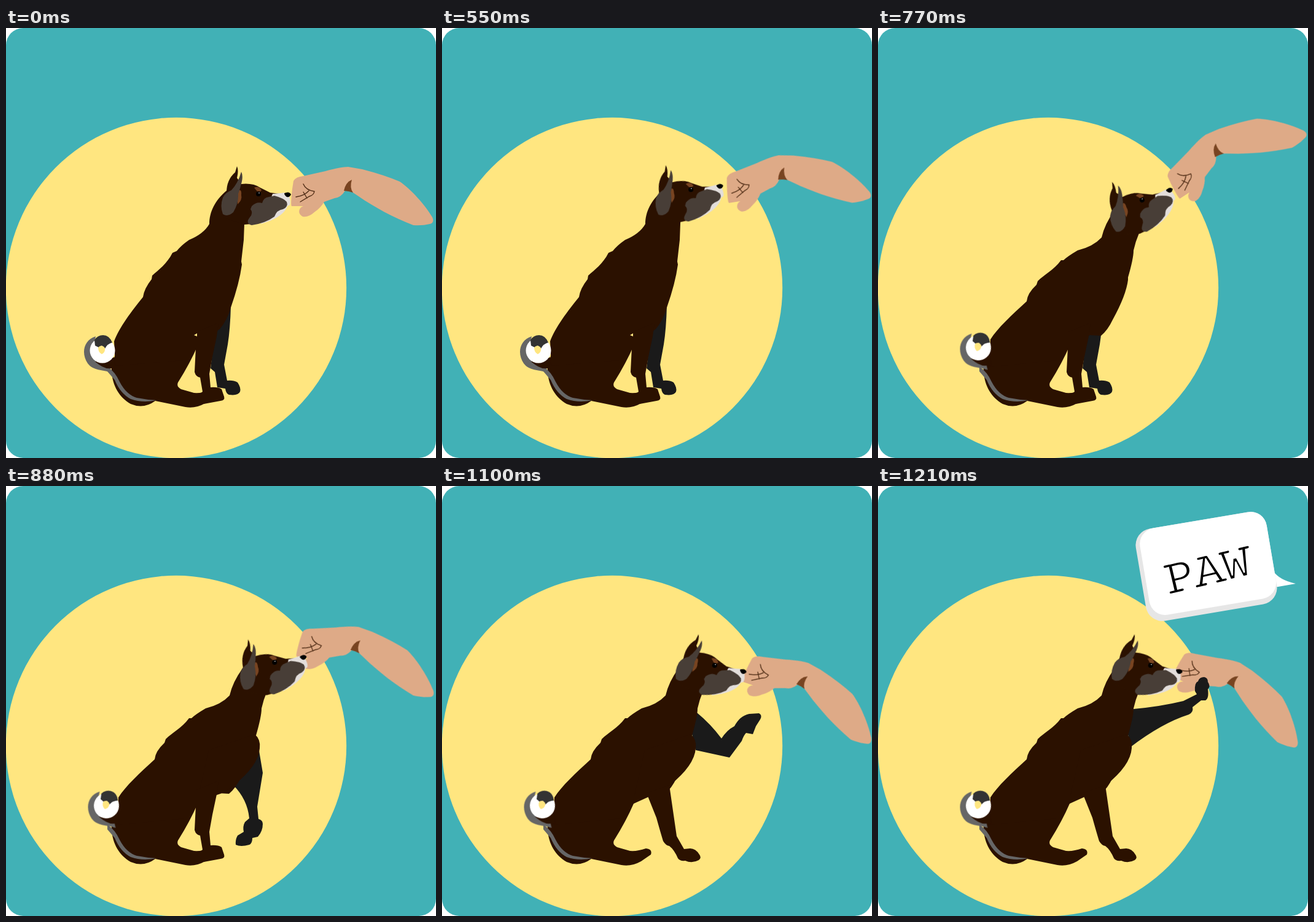
Recreate the animation shown at these times as an HTML page without scripts. Size 700x700 px, loop 2.31 s.

```html
<!DOCTYPE html>
<html lang="en">
<head>
<meta charset="utf-8">
<title>Paw</title>
<style>
  html, body { margin: 0; width: 100%; height: 100%; overflow: hidden; background: #fff; }
  svg { display: block; width: 100%; height: 100%; }

  .fur { fill: #2b1100; }
  .black { fill: #1a1a1a; }
  .mask { fill: #483e37; }
  .gray { fill: #666; }
  .tan { fill: #784421; }
  .skin { fill: #deaa87; }
  .line { fill: none; stroke: #502d16; stroke-width: 1.4; stroke-linecap: round; }

  /* Every pose holds, then switches: 21 beats of 110 ms */
  .arm, .head, .tail, .curl, .pose { animation: 2310ms step-end infinite; }

  .arm { transform-origin: 556px 258px; animation-name: arm; }
  @keyframes arm {
    0%      { transform: none; }
    23.810% { transform: translate(-4px, -19px) rotate(-9deg); }
    28.571% { transform: translate(-6px, -39px) rotate(-21deg); }
    33.333% { transform: translate(-6px, -57px) rotate(-33.3deg); }
    38.095% { transform: translate(12px, 3px) rotate(9.6deg); }
    42.857% { transform: translate(21px, 31px) rotate(14.5deg); }
    47.619% { transform: translate(29px, 60px) rotate(19.2deg); }
    52.381%, 100% { transform: translate(20px, 59px) rotate(23deg); }
  }

  .head { transform-origin: 411px 269px; animation-name: head; }
  @keyframes head {
    0%      { transform: none; }
    23.810% { transform: translate(-6px, -7px) rotate(-8deg); }
    28.571% { transform: translate(-6px, -8px) rotate(-14deg); }
    33.333% { transform: translate(18.5px, 10px) rotate(-21deg); }
    38.095% { transform: translate(26px, 17px) rotate(-11.3deg); }
    42.857% { transform: translate(30px, 20px) rotate(0deg); }
    47.619%, 100% { transform: translate(33px, 22px) rotate(10.5deg); }
  }

  .tail { animation-name: tail; }
  @keyframes tail {
    0% { transform: none; }
    33.333%, 100% { transform: translate(6.5px, -4.5px); }
  }
  .curl { transform-origin: 157px 525px; animation-name: curl; }
  @keyframes curl {
    0% { transform: none; }
    33.333%, 100% { transform: rotate(15deg); }
  }

  .upright  { animation-name: upright; }
  .leaning  { animation-name: leaning; }
  .chest    { animation-name: chest; }
  .planted  { animation-name: planted; }
  .forward  { animation-name: forward; }
  .far-down { animation-name: far-down; }
  .far-step { animation-name: far-step; }
  .far-lift { animation-name: far-lift; }
  .far-bend { animation-name: far-bend; }
  .reach    { animation-name: reach; }
  @keyframes upright  { 0% { opacity: 1 } 33.333%, 100% { opacity: 0 } }
  @keyframes leaning  { 0% { opacity: 0 } 33.333%, 100% { opacity: 1 } }
  @keyframes chest    { 0% { opacity: 0 } 38.095%, 100% { opacity: 1 } }
  @keyframes planted  { 0% { opacity: 1 } 47.619%, 100% { opacity: 0 } }
  @keyframes forward  { 0% { opacity: 0 } 47.619%, 100% { opacity: 1 } }
  @keyframes far-down { 0% { opacity: 1 } 38.095%, 100% { opacity: 0 } }
  @keyframes far-step { 0% { opacity: 0 } 38.095% { opacity: 1 } 42.857%, 100% { opacity: 0 } }
  @keyframes far-lift { 0% { opacity: 0 } 42.857% { opacity: 1 } 47.619%, 100% { opacity: 0 } }
  @keyframes far-bend { 0% { opacity: 0 } 47.619% { opacity: 1 } 52.381%, 100% { opacity: 0 } }
  @keyframes reach    { 0% { opacity: 0 } 52.381%, 100% { opacity: 1 } }

  .word {
    font: 72px "Liberation Mono", "Courier New", monospace;
    letter-spacing: 3px;
    stroke: #fff; stroke-width: 2.2;
  }
  .serif { fill: none; stroke: #000; stroke-width: 3.4; stroke-linecap: round; }
</style>
</head>
<body>
<svg viewBox="0 0 700 700">
  <rect width="700" height="700" rx="28" fill="#41b1b6"/>
  <circle cx="277" cy="423" r="277.2" fill="#ffe680"/>

  <g class="arm">
    <path class="skin" d="M468 249Q472 242 484 241L520 233Q545 226 557 226L580 230Q615 239 641 250C660 263 682 288 694 308Q698 317 690 319Q678 322 663 321C630 308 600 292 574 274L562 266L552 265Q545 276 535 277L518 283Q512 293 503 299Q492 309 483 307Q475 303 478 295Q480 291 484 290L465 290Q463 288 466 262Z"/>
    <path class="tan" d="M563 247Q553 251 550 265L558 266L565 268Q559 260 563 247Z"/>
    <path class="line" d="M484 254Q488 264 502 266M472 275Q486 273 493 265M484 267L490 277M502 266Q501 272 494 274L479 283"/>
  </g>

  <!-- Far foreleg -->
  <g class="black">
    <path class="pose far-down" d="M345 465L366 452Q365 490 361 515L355 548L360 574Q370 573 377 577Q383 586 381 592Q378 599 363 597Q358 595 357 587L344 585L340 560L333 554L337 520Z"/>
    <path class="pose far-step" d="M411 425L418 467L409 522L411 542Q418 544 418 550Q418 562 410 571L401 573Q401 582 396 584Q382 588 374 584Q373 576 377 569L387 563Q385 554 389 547L396 541Q393 510 370 487Z"/>
    <path class="pose far-lift" d="M414 390L440 425L450 452L449 474L462 492Q467 502 460 507L448 509L439 498L430 478L432 466L396 455Z"/>
    <path class="pose far-bend" d="M415 369Q437 387 455 411Q464 397 476 391Q485 374 500 371L516 370Q522 373 518 380L511 391L506 404L495 402Q491 406 488 415L468 442L413 430L406 400Z"/>
    <path class="pose reach" d="M416 363Q460 359 497 350L519 339L516 334Q515 320 521 318Q523 311 531 311Q537 312 537 319Q542 326 537 331Q539 346 533 349L526 349L512 360Q514 368 506 372Q462 386 411 425L405 395Z"/>
  </g>

  <!-- Body -->
  <g class="fur">
    <path d="M190 510Q170 542 172 559C173 582 185 602 203 612Q224 621 243 607L292 617Q308 620 324 611L340 600Q343 591 332 590Q318 595 306 594L285 588Q277 584 280 577Q300 545 312 517L300 480Z"/>
    <path class="pose upright" d="M360 264C340 280 331 300 331 319Q322 335 298 345Q285 354 278 363L271 366C262 384 248 394 238 403L237 409Q225 424 223 438C205 460 184 488 176 510L178 550L300 540L311 517L348 490Q360 476 366 455Q380 415 384 385L383 380L387 345L388 318L395 270Z"/>
    <path class="pose leaning" d="M385 297Q369 319 364 341Q350 356 325 362Q308 372 302 378L298 378C286 394 270 402 260 412L258 418Q243 432 242 445C218 467 195 488 183 507L182 552L300 540L311 517L345 500L363 501Q374 492 382 475Q404 435 407 410L407 406Q416 375 416 362Q419 348 425 334L422 290Z"/>
    <path class="pose chest" d="M405 404Q415 413 413 427Q411 455 371 487Q355 500 343 503L310 518L330 430Z"/>
    <path class="pose planted" d="M310 495L309 520L307 560Q309 568 316 569L320 592L310 600L322 612L349 607Q357 606 355 600L351 588Q345 584 333 585L331 563L336 535L343 502L346 480Z"/>
    <path class="pose forward" d="M333 500L349 540Q356 565 360 578Q364 585 370 586Q378 592 384 606Q387 611 396 610Q407 615 418 609Q423 605 419 600Q413 590 404 590L394 591L382 570L370 487Z"/>
  </g>
  <path class="pose upright" d="M306 500L311 497V502Z" fill="#ffe680"/>

  <!-- Curled tail; the stripe on the haunch stays put -->
  <path class="gray" d="M165 551Q178 560 185 576Q196 597 213 602Q228 605 245 606Q222 611 203 604Q186 595 177 573L165 559Z"/>
  <g class="tail">
    <path class="gray" d="M146 502C126 508 122 530 133 546C142 558 157 556 172 561L170 553L160 540L142 520Z"/>
    <path class="fur" d="M145 543Q160 556 170 554L178 555L176 536L160 541Z"/>
    <g class="curl">
      <circle cx="157" cy="525" r="20.5" fill="#fff"/>
      <path fill="#333" d="M144 508Q149 500 158 500Q168 500 173 512Q165 514 161 522Q156 514 151 520L145 517Z"/>
      <path fill="#ffe680" d="M150 520Q156 514 161 521Q162 528 156 531Q150 528 150 520Z"/>
    </g>
  </g>

  <g class="head">
    <path class="fur" d="M359 268Q359 247 373 235L376 225Q379 232 376 244L383 254Q402 252 414 260L430 268L446 270L455 285L440 300L400 319L388 320L355 309Q348 280 359 268Z"/>
    <path fill="#e3dedb" d="M434 270Q447 269 453 268L461 274Q464 283 462 288L458 290Q454 303 432 313L415 319Z"/>
    <path class="mask" d="M400 290Q408 282 417 285Q419 276 428 275L437 273Q452 277 457 283Q460 291 451 295Q441 296 437 307Q422 318 400 321Q389 318 397 308Q403 301 398 295Z"/>
    <path d="M453 269Q461 265 464 271Q462 276 457 275Q453 272 453 269Z"/>
    <path class="tan" d="M404 260Q411 256 416 264Q414 268 409 266ZM377 266Q384 260 383 272Q385 280 377 287Z"/>
    <path class="mask" d="M383 234Q387 242 382 257Q381 262 378 270Q379 285 370 300Q361 308 353 303Q348 290 353 276Q357 268 367 264Q378 252 383 234Z"/>
    <circle cx="411" cy="270" r="4"/>
    <circle cx="412" cy="268.5" r=".8" fill="#fff"/>
  </g>

  <!-- Speech bubble -->
  <g class="pose reach">
    <path fill="#fff" d="M643 138Q653 153 680 159L640 166Z"/>
    <g transform="translate(534.5 131) rotate(-9.6)">
      <rect x="-108" y="-76" width="216" height="152" rx="27" fill="#e6e6e6"/>
      <rect x="-101" y="-76" width="209" height="143" rx="26" fill="#fff"/>
    </g>
    <g transform="translate(476 175.5) rotate(-13.3)">
      <text class="word" x="1">PAW</text>
      <path class="serif" d="M1-2H21M1-45H9M45-2H60M79-2H93M57-45H70M93-45H107M126-45H140"/>
    </g>
  </g>
</svg>
</body>
</html>
```
